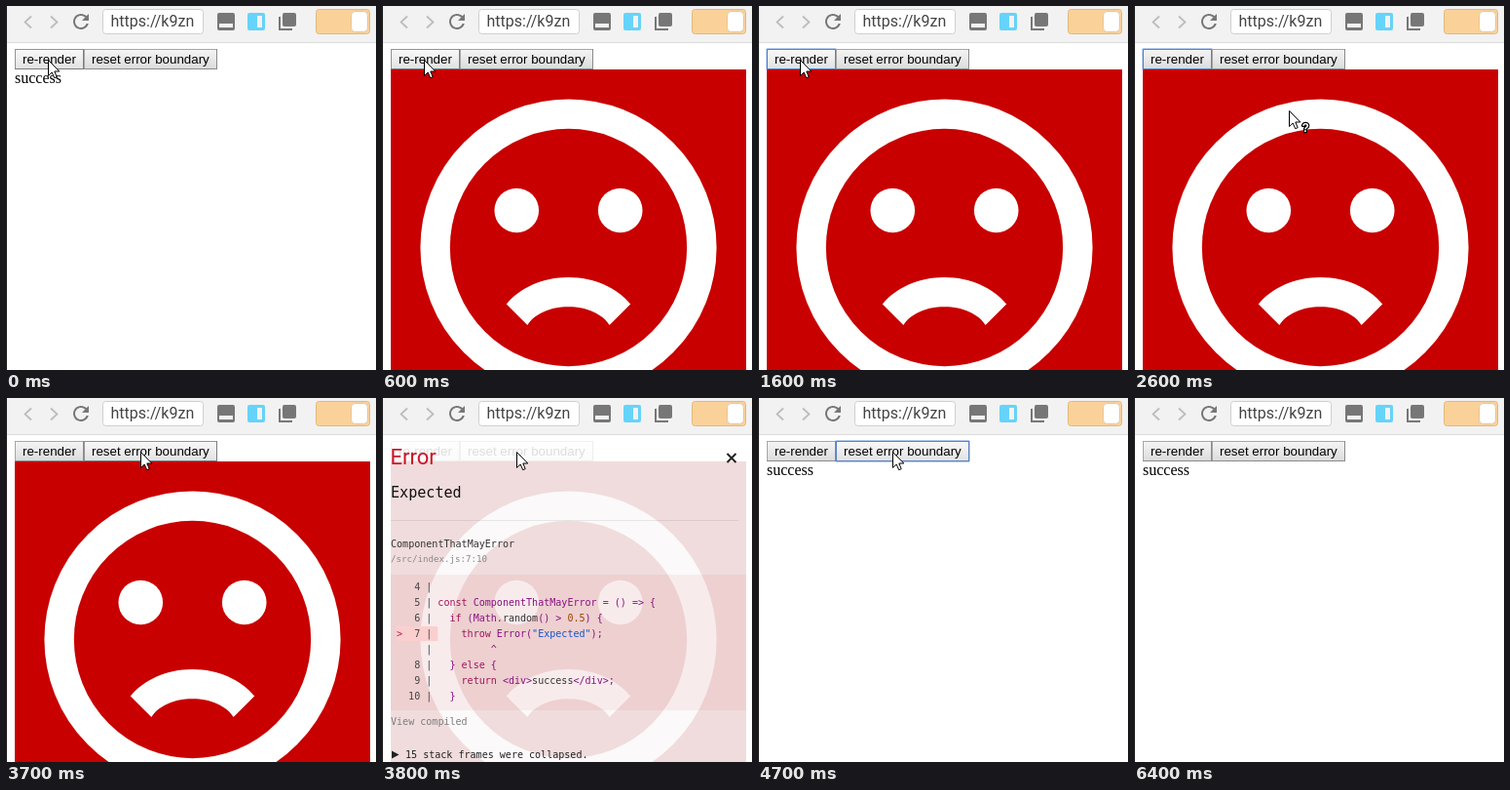
These frames come from a looping animation (380x373 px, 6.5 s). An HTML page with a canvas:

```html
<!DOCTYPE html>
<html lang="en">
<head>
<meta charset="utf-8">
<title>Error boundary demo</title>
<style>
  html, body { margin: 0; width: 100%; height: 100%; overflow: hidden; background: #fff; }
  canvas { display: block; }
</style>
</head>
<body>
<canvas id="stage" width="380" height="373"></canvas>
<script>
const ctx = document.getElementById('stage').getContext('2d');
const LOOP = 6500;
const SANS = '"Liberation Sans", Arial, sans-serif';
const MONO = '"DejaVu Sans Mono", monospace';
const ROBOTO = 'Roboto, sans-serif';

// Pointer positions, held until the next entry: [ms, x, y]
const POINTER = [
  [0, 43, 55], [1900, 55, 72], [2000, 98, 118], [2100, 148, 170], [2200, 167, 191],
  [2400, 290, 262], [2500, 360, 280], [2600, 159, 107], [2700, 152, 88],
  [2800, 149, 73], [2900, 147, 64], [3000, 145, 60], [3100, 138, 55],
  [5500, 134, 72], [5600, 122, 128], [5700, 102, 228], [5800, 79, 351], [5900, 60, 420]
];

const CODE = [
  '   4 |',
  '   5 | const ComponentThatMayError = () => {',
  '   6 |   if (Math.random() > 0.5) {',
  '>  7 |     throw Error("Expected");',
  '     |          ^',
  '   8 |   } else {',
  '   9 |     return <div>success</div>;',
  '  10 |   }'
];
const TOKENS = [
  [/^"[^"]*"/, '#1155cc'],
  [/^(const|if|throw|else|return)\b/, '#a0145a'],
  [/^<\/?div>/, '#881280'],
  [/^\d+(\.\d+)?/, '#994500'],
  [/^[A-Z]\w*/, '#881280'],
  [/^[^\w\s]+?/, '#881280'],
  [/^(\w+|\s+)/, '#333']
];

const RELOAD = new Path2D('M17.65 6.35C16.2 4.9 14.21 4 12 4c-4.42 0-7.99 3.58-7.99 8s3.57 8 7.99 8c3.73 0 6.84-2.55 7.73-6h-2.08c-.82 2.33-3.04 4-5.65 4-3.31 0-6-2.69-6-6s2.69-6 6-6c1.66 0 3.14.69 4.22 1.78L13 11h7V4z');
const MOUTH = new Path2D('M12 14C13.75 14 15.29 14.72 16.19 15.81L14.77 17.23C14.32 16.5 13.25 16 12 16S9.68 16.5 9.23 17.23L7.81 15.81C8.71 14.72 10.25 14 12 14Z');
const ARROW = new Path2D('M.5.5V16.5L4.2 13L6.7 18.7L9.2 17.6L6.8 12H11.8Z');

function rect(x, y, w, h, fill) {
  ctx.fillStyle = fill;
  ctx.fillRect(x, y, w, h);
}

function box(x, y, w, h, r, fill, stroke) {
  ctx.beginPath();
  ctx.roundRect(x, y, w, h, r);
  if (fill) { ctx.fillStyle = fill; ctx.fill(); }
  if (stroke) { ctx.strokeStyle = stroke; ctx.lineWidth = 1; ctx.stroke(); }
}

function line(points, color, width) {
  ctx.beginPath();
  points.forEach(([x, y]) => ctx.lineTo(x, y));
  ctx.strokeStyle = color;
  ctx.lineWidth = width;
  ctx.stroke();
}

function text(str, x, y, font, color) {
  ctx.font = font;
  ctx.fillStyle = color;
  ctx.fillText(str, x, y);
}

function toolbar() {
  const gray = '#777';
  rect(0, 0, 380, 37, '#f2f2f2');
  rect(0, 37, 380, 1, '#dcdcdc');
  line([[26, 10.5], [19.5, 16.5], [26, 22.5]], '#bdbdbd', 1.8);
  line([[46, 10.5], [52.5, 16.5], [46, 22.5]], '#bdbdbd', 1.8);
  ctx.save();
  ctx.translate(65, 4);
  ctx.fillStyle = gray;
  ctx.fill(RELOAD);
  ctx.restore();

  box(99.5, 3.5, 103, 25, 3, '#fff', '#cfcfcf');
  text('https://k9zn', 107.5, 21, '16px ' + ROBOTO, '#444');

  box(217, 7, 18, 18, 2, gray);
  rect(219, 18, 14, 4, '#f2f2f2');
  box(248, 7, 18, 18, 2, '#66d3fa');
  rect(258, 10, 5, 12, '#f2f2f2');
  box(284, 7, 14, 14, 2, gray);
  line([[281, 11], [281, 24], [294, 24]], gray, 2);

  box(318.5, 3.5, 55, 25, 3, '#fbd19a', '#e3b878');
  box(354.5, 5.5, 17, 21, 4, '#fff', '#e6c596');
}

function button(x, w, label, { hover, pressed, focus }) {
  const g = ctx.createLinearGradient(0, 45, 0, 64);
  g.addColorStop(0, pressed ? '#d8d8d8' : hover ? '#f8f8f8' : '#f4f4f4');
  g.addColorStop(1, pressed ? '#ececec' : hover ? '#e2e2e2' : '#dcdcdc');
  rect(x, 44, w, 21, hover ? '#7c7c7c' : '#8a8a8a');
  rect(x, 44, w - 1, 20, hover ? '#949494' : '#a6a6a6');
  rect(x + 1, 45, w - 2, 19, g);
  if (focus) {
    box(x - .5, 43.5, w + 1, 22, 1, null, 'rgba(90,140,220,.45)');
    box(x + .5, 44.5, w - 1, 20, 0, null, '#5a82c4');
  }
  text(label, x + 8, 59, '13.333px ' + SANS, '#000');
}

function face(back, front) {
  const dot = (x, y, r) => {
    ctx.beginPath();
    ctx.arc(x, y, r, 0, 2 * Math.PI);
  };
  rect(9, 65, 365, 308, back);
  ctx.save();
  ctx.translate(9, 65);
  ctx.scale(365 / 24, 365 / 24);
  ctx.fillStyle = ctx.strokeStyle = front;
  ctx.lineWidth = 2;
  dot(12, 12, 9);
  ctx.stroke();
  for (const x of [8.5, 15.5]) {
    dot(x, 9.5, 1.5);
    ctx.fill();
  }
  ctx.fill(MOUTH);
  ctx.restore();
}

function codeLine(src, y) {
  const font = '10.05px ' + MONO;
  ctx.font = font;
  const cell = ctx.measureText('0').width;
  const put = (str, col, color) => text(str, 15 + col * cell, y, font, color);
  if (src[0] === '>') {
    rect(15, y - 11, 7 * cell, 15, '#fccfcf');
    put('>', 0, '#c2185b');
  }
  put(src.slice(1, 6), 1, '#444');
  for (let col = 6; col < src.length;) {
    const rest = src.slice(col);
    const [rule, color] = TOKENS.find(([re]) => re.test(rest));
    const token = rest.match(rule)[0];
    put(token, col, color);
    col += token.length;
  }
}

function overlay() {
  rect(1, 38, 379, 27, 'rgba(255,255,255,.87)');
  face('#f0dcdc', '#fbf9f9');
  text('Error', 8.5, 68, '22px ' + ROBOTO, '#ce1126');
  line([[354.5, 57], [363.5, 66]], '#222', 2);
  line([[363.5, 57], [354.5, 66]], '#222', 2);
  text('Expected', 9, 102, '15.1px ' + MONO, '#111');
  rect(9, 125, 357, 1, 'rgba(0,0,0,.08)');
  text('ComponentThatMayError', 9, 153, '10.05px ' + MONO, '#333');
  text('/src/index.js:7:10', 9, 168, '9.13px ' + MONO, '#888');
  rect(9, 181, 365, 139, 'rgba(206,17,38,.06)');
  CODE.forEach((src, i) => codeLine(src, 197 + 16 * i));
  text('View compiled', 9, 335, '10.05px ' + MONO, '#7c7c7c');
  ctx.beginPath();
  ctx.moveTo(10, 361.5);
  ctx.lineTo(17.5, 365.5);
  ctx.lineTo(10, 369.5);
  ctx.fillStyle = '#222';
  ctx.fill();
  text('15 stack frames were collapsed.', 24, 369, '10.05px ' + MONO, '#222');
}

function pointer(x, y, kind) {
  ctx.save();
  ctx.translate(x, y);
  if (kind === 'beam') {
    line([[-1, -6.5], [1.5, -6.5], [2.5, -5.5], [3.5, -6.5], [6, -6.5]], '#111', 1);
    line([[2.5, -6], [2.5, 8]], '#111', 1.2);
    line([[-1, 8.5], [1.5, 8.5], [2.5, 7.5], [3.5, 8.5], [6, 8.5]], '#111', 1);
  } else {
    ctx.fillStyle = '#fff';
    ctx.fill(ARROW);
    ctx.strokeStyle = '#000';
    ctx.lineWidth = 1;
    ctx.stroke(ARROW);
    if (kind === 'help') {
      ctx.font = 'bold 12px ' + SANS;
      ctx.lineWidth = 2.4;
      ctx.lineJoin = 'round';
      ctx.strokeText('?', 13.5, 22);
      text('?', 13.5, 22, ctx.font, '#fff');
    }
  }
  ctx.restore();
}

function draw(t) {
  const during = (a, b) => t >= a && t < b;
  const failed = during(600, 4700);
  const covered = during(700, 1600) || during(3800, 4300);
  const [, x, y] = POINTER.findLast(p => p[0] <= t);
  const onBar = y >= 44 && y < 65;

  rect(0, 0, 380, 373, '#fff');
  toolbar();
  button(9, 71, 're-render', {
    hover: onBar && x < 80,
    pressed: during(400, 600),
    focus: during(1600, 3500)
  });
  button(80, 137, 'reset error boundary', {
    hover: onBar && x >= 80,
    pressed: during(3500, 3700),
    focus: during(4300, 6400)
  });
  if (covered) overlay();
  else if (failed) face('#c80000', '#fff');
  else text('success', 9, 79, '16px "Liberation Serif", "Times New Roman", serif', '#000');
  rect(0, 0, 1, 373, '#222');

  const kind = covered && x < 57 ? 'beam' : failed && !covered && y >= 65 ? 'help' : 'arrow';
  pointer(x, y, kind);
}

const start = performance.now();
function tick() {
  draw((performance.now() - start) % LOOP);
  requestAnimationFrame(tick);
}
tick();
</script>
</body>
</html>
```
